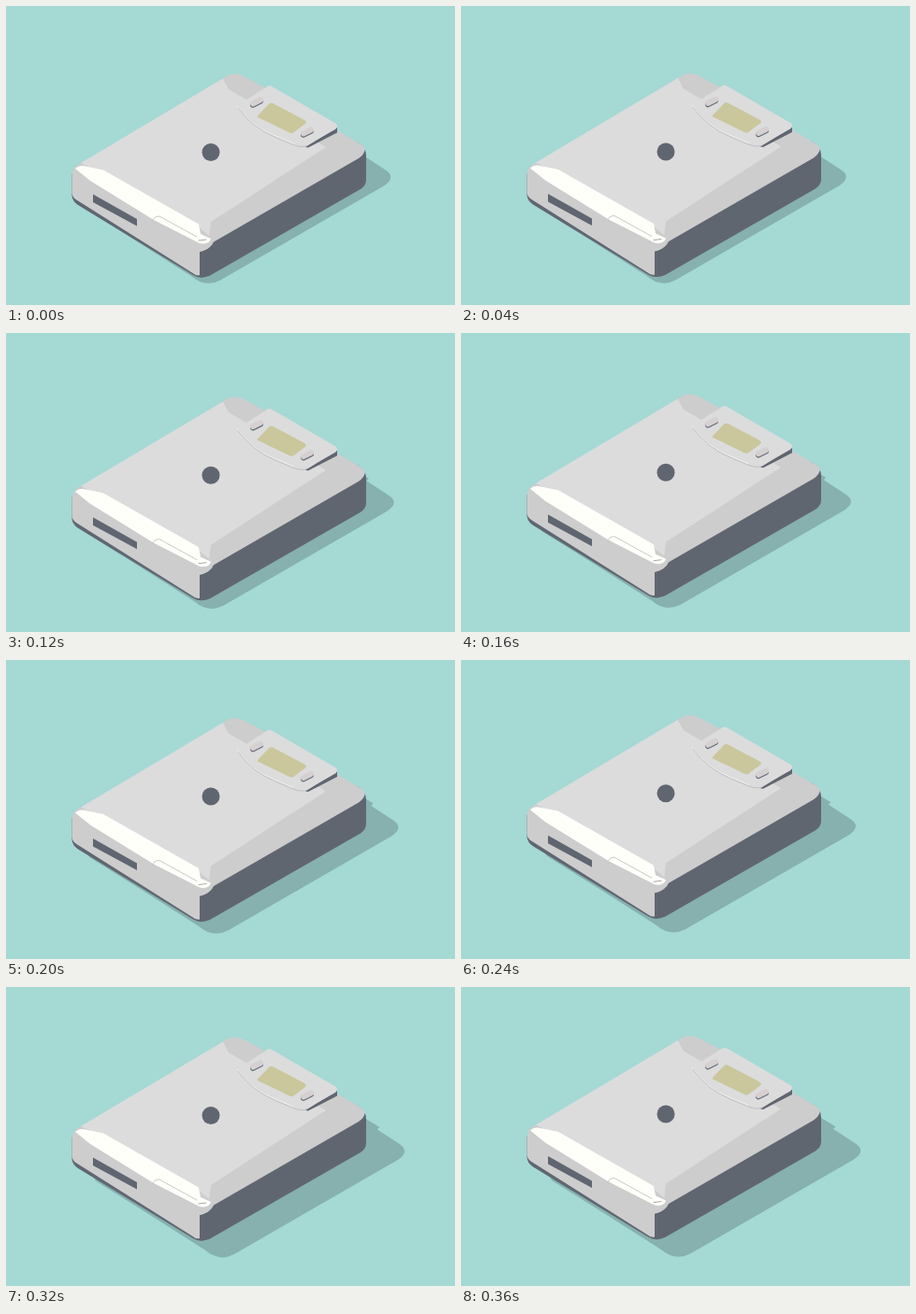
Write an HTML page that moves like this. It is 480 px wide and 320 px high and loops after 400 ms.

```html
<!DOCTYPE html>
<html lang="en">
<head>
<meta charset="utf-8">
<title>Floating player</title>
<style>
  html, body { margin: 0; width: 100%; height: 100%; overflow: hidden; background: #a4d9d4; }
  svg { display: block; width: 480px; height: 320px; }
  .dark { fill: #606670; }
  .top { fill: #dcdcdd; }
  .bevel { fill: #cdcdce; }
  .white { fill: #fffffa; }
  .line { fill: none; stroke-linecap: round; stroke-linejoin: round; }
</style>
</head>
<body>
<svg viewBox="0 0 480 320">
  <rect width="480" height="320" fill="#a4d9d4"/>
  <path id="shadow" fill="#86b1ae" d="M77 208L81 215L140 252L198 289Q213 302 229 293.500L404 192.500Q418 183 405 175L382 160L384.500 157.500L369 148L300 120Z"/>
  <g id="device">
    <!-- body -->
    <path class="dark" d="M70.500 180V203Q71 209 77 213L200 288Q208 293 218 288.500L379 196Q385 192 385 186V160Q385 151 376 146L300 120Z"/>
    <path class="bevel" d="M207 263Q219 260 222 252.500L377 163Q383 159 384 153Q382 149 376 146L354 133L276 88L262 80Q243 69 232 77.500L200 180Z"/>
    <path class="top" d="M80 168L232 77.500L238 89L250 96L342 151L219 231L217 249L205 240Z"/>
    <path class="bevel" d="M232 77.500Q242 69.500 254 75L278 88L262 97L249 95L238 89Z"/>

    <!-- front -->
    <path class="bevel" d="M70.500 181Q71 172 80 168L205 236L221 249Q221 260 207 263V288Q203 289 199 285.500L77 208.500Q70.500 205 70.500 200Z"/>
    <path class="white" d="M74 174Q77 171 82 171L104 175.500L206 233.500L208 244L219 249Q217 256 207 254L158 229L90 187Z"/>
    <path class="line" stroke="#c9c9c7" d="M157 231Q157 225 164 225L204 247"/>
    <path class="line" stroke="#a8a8aa" d="M206 251L214 250"/>
    <path class="dark" d="M93 201.500L140 228V235.500L93 210Z"/>

    <!-- display -->
    <path class="dark" d="M320 151L354 130V135.500L323 151.500Z"/>
    <path class="top" d="M278 87Q281 84 285 86.500L353 126Q355.500 129 352 132L321 149.500Q316 151 307 147L288 139Q262 129 247 107L262 97Z"/>
    <path class="line" stroke="#f0f0f0" d="M247 107Q262 129 288 139L307 147"/>
    <path class="line" stroke="#b4b4b8" stroke-width=".7" d="M248 109Q263 130 288 140.500L307 148.500Q316 152 321 150"/>
    <path fill="#cac79c" d="M269 117.500L281 105Q283 103 286 104.500L319 122Q322 124 320 126L308 135Q306 137 303 135.500L271 120Q268 119 269 117.500Z"/>
    <g id="buttons"></g>

    <circle class="dark" cx="219" cy="156.500" r="9.500"/>
  </g>
</svg>
<script>
  const LOOP = 400, STEP = 40;
  const byId = id => document.getElementById(id);
  const device = byId('device'), shadow = byId('shadow');

  const button = (x, y) => {
    const bar = (dy, color) =>
      `<path class="line" stroke="${color}" stroke-width="6" d="M${x - 4} ${y + 2 + dy}l8 -4"/>`;
    return bar(1.3, '#656b76') + bar(0, '#d6d0d1');
  };
  byId('buttons').innerHTML = button(268, 102.5) + button(322, 134.5);

  const move = (el, x, y) => el.setAttribute('transform', `translate(${x} ${y})`);

  function draw() {
    const t = Math.floor((performance.now() % LOOP) / STEP) * STEP;
    const lift = (1 - Math.cos(Math.PI * t / LOOP)) / 2;
    move(device, 0, -21 * lift);
    move(shadow, 16.4 * lift, -8.2 * lift);
    requestAnimationFrame(draw);
  }
  draw();
</script>
</body>
</html>
```
